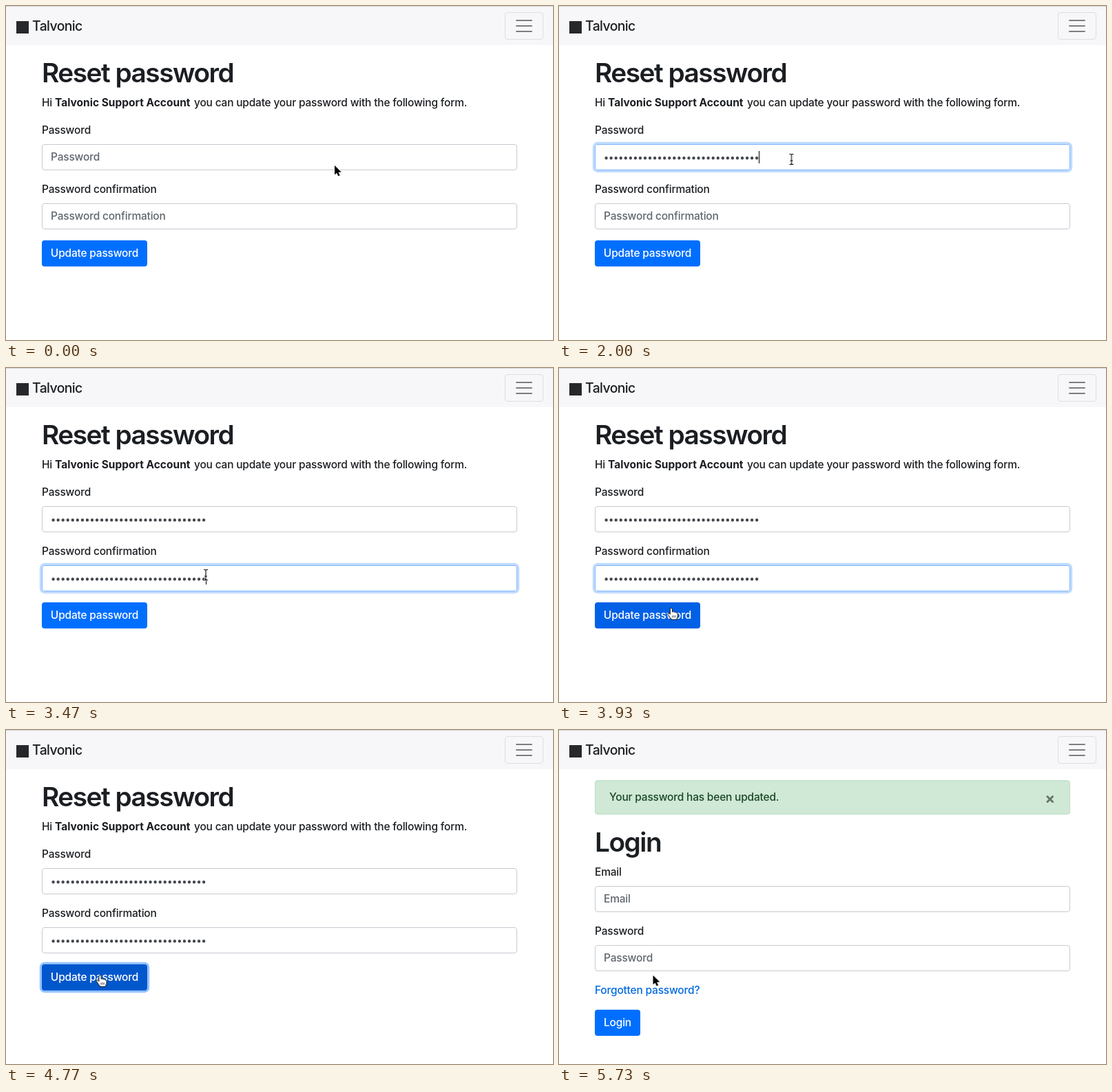
These frames come from a looping animation (794 px wide and 486 px high, 5.76 s). An HTML page:

```html
<!DOCTYPE html>
<html lang="en">
<head>
<meta charset="utf-8">
<title>Reset password</title>
<style>
* { box-sizing: border-box; }
html, body { margin: 0; width: 100%; height: 100%; overflow: hidden; background: #fff; }
body {
  position: relative;
  font: 450 15.5px/24px Inter, "Liberation Sans", sans-serif;
  font-optical-sizing: none;
  letter-spacing: -.2px;
  color: #1b1e22;
  cursor: default;
}
nav { position: absolute; inset: 0 0 auto; height: 57px; background: #f7f7f9; border-top: 1px solid #d4d4d6; }
.mark { position: absolute; left: 15px; top: 21px; width: 18px; height: 18px; background: #26282b; }
.brand { position: absolute; left: 38px; top: 13px; font-size: 19.4px; line-height: 30px; letter-spacing: -.6px; }
.menu { position: absolute; left: 724px; top: 8px; width: 56px; height: 40px; border: 1px solid #dedee0; border-radius: 4px; }
.menu svg { position: absolute; left: 12px; top: 4px; }
main { position: absolute; left: 52px; top: 73px; width: 690px; }
h1 { margin: 0 0 8px; font-size: 38.8px; line-height: 48px; font-weight: 580; letter-spacing: -1.5px; }
p { position: relative; margin: 0 0 16px; height: 24px; white-space: nowrap; }
b { letter-spacing: 0; }
.rest { position: absolute; left: 221px; }
.label { margin-bottom: 8px; }
.field { position: relative; height: 38px; margin-bottom: 16px; padding: 6px 12px; border: 1px solid #c6cad0; border-radius: 4px; color: #5f666e; }
.field svg { position: absolute; left: 12px; top: 0; }
.caret { position: absolute; left: 12px; top: 9px; width: 1px; height: 18px; background: #000; }
.btn { height: 38px; line-height: 38px; border-radius: 4px; background: #006fff; color: #fff; font-weight: 500; text-align: center; }
.alert { position: relative; height: 50px; margin-bottom: 16px; padding: 12px 20px; border: 1px solid #bcdfc5; border-radius: 4px; background: #d0e8d6; color: #194826; }
.close { position: absolute; right: 20px; top: 13px; width: 17px; text-align: center; font-size: 22px; font-weight: 700; color: #68746b; }
.link { color: #0069e0; }
#login { opacity: 0; }
#cursor { position: absolute; left: 0; top: 0; }
#cursor svg { position: absolute; left: 0; top: 0; width: 1px; height: 1px; overflow: visible; }
</style>
</head>
<body>
<nav>
  <div class="mark"></div>
  <div class="brand">Talvonic</div>
  <div class="menu"><svg width="30" height="30"><path d="M4 7h22M4 15h22M4 23h22" stroke="#7d7d7f" stroke-width="2" stroke-linecap="round"/></svg></div>
</nav>

<main id="reset">
  <h1>Reset password</h1>
  <p>Hi <b>Talvonic Support Account</b><span class="rest">you can update your password with the following form.</span></p>
  <p class="label">Password</p>
  <div class="field" id="first"><span>Password</span></div>
  <p class="label">Password confirmation</p>
  <div class="field" id="second"><span>Password confirmation</span></div>
  <div class="btn" id="update" style="width:153px">Update password</div>
</main>

<main id="login">
  <div class="alert">Your password has been updated.<span class="close">×</span></div>
  <h1>Login</h1>
  <p class="label">Email</p>
  <div class="field">Email</div>
  <p class="label">Password</p>
  <div class="field">Password</div>
  <p class="link">Forgotten password?</p>
  <div class="btn" style="width:66px">Login</div>
</main>

<div id="cursor">
  <svg id="arrow"><path d="M0 0V13.6L3.1 10.7 5.2 15.6 7.6 14.6 5.5 9.8H9.8Z" stroke="#fff" stroke-width="1.6" paint-order="stroke"/></svg>
  <svg id="beam" fill="none">
    <g id="beamLine"><path d="M-3 -7.5h1.5q1.5 0 1.5 1.5V6q0 1.5 -1.5 1.5h-1.5M3 -7.5h-1.5q-1.5 0 -1.5 1.5M0 6q0 1.5 1.5 1.5h1.5M-2 2h4"/></g>
    <use href="#beamLine" stroke="#fff" stroke-width="2.6"/>
    <use href="#beamLine" stroke="#000" stroke-width="1.1"/>
  </svg>
  <svg id="hand" fill="#fff" stroke="#111" stroke-linejoin="round">
    <path d="M-1.6 1.4a1.6 1.6 0 0 1 3.2 0V5.2q2.4 -1 3 .6q2.4 -.7 2.8 .9q2 -.4 2.1 1.6V11q0 2.2 -1.4 4V16.5H-.2V15.2q-2 -1.6 -3.3 -4.2l-2 -2.8q.4 -1.8 2.2 -1l1.7 1.7z"/>
    <path d="M1.6 10.5v3M3.7 10.5v3M5.8 10.5v3" stroke-width=".8"/>
  </svg>
</div>

<script>
const LOOP = 5760;
const $ = id => document.getElementById(id);

// Steps are [ms, properties, easing]; without an easing the value holds.
function track(el, steps) {
  const frames = steps.map(([ms, props, easing = 'step-end']) => ({ offset: ms / LOOP, easing, ...props }));
  frames.push({ offset: 1, ...steps[steps.length - 1][1] });
  el.animate(frames, { duration: LOOP, iterations: Infinity });
}

const show = (el, ...steps) => track(el, steps.map(([ms, on]) => [ms, { opacity: on }]));

function addDots(field) {
  field.insertAdjacentHTML('beforeend',
    '<svg width="240" height="36"><path d="M3.6 19.2H222.5" stroke="#43474d" stroke-width="4.4" stroke-linecap="round" stroke-dasharray="0 7.05"/></svg>');
  return field.lastChild;
}

function addCaret(field, steps) {
  const caret = document.createElement('div');
  caret.className = 'caret';
  field.append(caret);
  track(caret, steps.map(([ms, opacity, x = 0]) => [ms, { opacity, transform: `translateX(${x}px)` }]));
}

const plain = { borderColor: '#c6cad0', boxShadow: '0 0 0 0 rgba(0,111,255,0)' };
const focused = { borderColor: '#80b5f8', boxShadow: '0 0 0 3.2px rgba(0,111,255,.25)' };
const FADE = 150;

function setupField(id, { focus, paste, blur, caret }) {
  const field = $(id);
  track(field, [
    [0, plain],
    [focus, plain, 'ease-in-out'],
    [focus + FADE, focused],
    [blur, focused, 'ease-in-out'],
    [blur + FADE, plain]
  ]);
  show(field.firstElementChild, [0, 1], [paste, 0]);
  show(addDots(field), [0, 0], [paste, 1]);
  addCaret(field, caret);
}

const END = 225;
setupField('first', {
  focus: 1325, paste: 1970, blur: 2720,
  caret: [[0, 0], [1325, 1], [1770, 0], [1970, 1, END], [2470, 0, END]]
});
setupField('second', {
  focus: 2720, paste: 3200, blur: 4550,
  caret: [[0, 0], [2715, 1], [3200, 1, END], [3710, 0, END], [4210, 1, END], [4550, 0, END]]
});

const button = (backgroundColor, ring) =>
  ({ backgroundColor, boxShadow: ring ? '0 0 0 3.2px rgba(38,134,255,.5)' : '0 0 0 0 rgba(38,134,255,0)' });
track($('update'), [
  [0, button('#006fff')],
  [3740, button('#006fff'), 'ease-in-out'],
  [3890, button('#0061e6')],
  [4550, button('#0061e6'), 'ease-in-out'],
  [4700, button('#0057cc', true)]
]);

const SWITCH = 5250;
show($('reset'), [0, 1], [SWITCH, 0]);
show($('login'), [0, 0], [SWITCH, 1]);

const at = (x, y) => ({ transform: `translate(${x}px,${y}px)` });
track($('cursor'), [
  [0, at(477, 232)],
  [500, at(477, 232), 'ease-in-out'],
  [1300, at(337.5, 223)],
  [2000, at(337.5, 223), 'ease-in-out'],
  [2680, at(292.5, 301)],
  [3170, at(292.5, 301), 'linear'],
  [3470, at(290, 301), 'ease-in'],
  [3720, at(222, 336), 'ease-out'],
  [3930, at(163, 349.5), 'ease-out'],
  [4450, at(136.5, 357)]
]);
show($('arrow'), [0, 1], [540, 0], [3640, 1], [3740, 0], [5570, 1]);
show($('beam'), [0, 0], [540, 1], [3640, 0]);
show($('hand'), [0, 0], [3740, 1], [5570, 0]);
</script>
</body>
</html>
```
